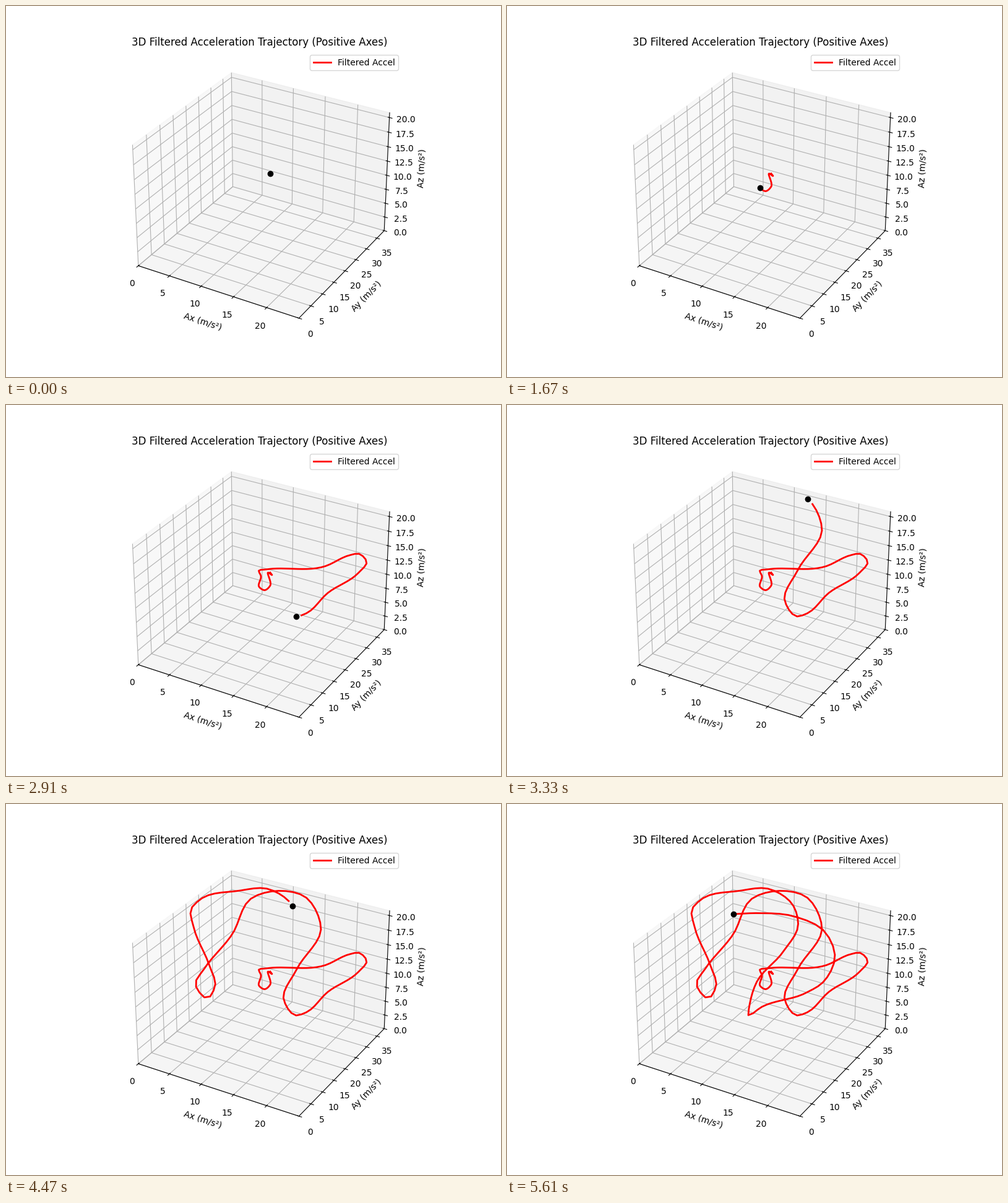
Animation of 800x600 px, one loop 5.63 s. Source, as a matplotlib script:

```python
import numpy as np
import matplotlib.pyplot as plt
from matplotlib.animation import FuncAnimation

LOOP_MS = 5630
FRAMES = 281
START = 8
W, H = 800, 600
LIMITS = (24.78, 38.6, 20.82)

# Legs of the trajectory: arrival frame and key points, in stage pixels
LEGS = [
    (52, [(427, 271), (430, 275), (424, 271)]),
    (83, [(427, 292), (418, 299.5), (409, 294)]),
    (98, [(412, 276.5), (408.5, 268)]),
    (121, [(420, 266), (515, 261), (557, 242.5)]),
    (145, [(570, 240.5), (583, 254), (570, 271), (520, 304), (484, 337.5),
           (469, 342)]),
    (186, [(449, 317), (470, 267), (509, 200), (484, 150.5), (438, 140.5),
           (396, 153), (366, 210), (320, 267)]),
    (223, [(306, 291), (326, 314.5), (338, 294), (329, 262), (303, 198),
           (299, 170), (313, 155), (375, 140.5), (424, 137.5), (463, 165)]),
    (244, [(470.5, 196), (447, 238), (403, 289), (391.5, 328), (390, 341.5)]),
    (259, [(411, 328.5), (483, 305.5), (510.5, 288.5)]),
    (280, [(530, 246), (514, 207), (465, 182), (405, 176.5), (366, 178)]),
]


def hermite(t, p, at, rest=False):
    """Smooth curve through (t, p); with rest it starts and ends at zero speed."""
    m = np.gradient(p, t, axis=0)
    if rest:
        m[0] = m[-1] = 0
    i = np.clip(np.searchsorted(t, at, side="right") - 1, 0, len(t) - 2)
    h = (t[i + 1] - t[i])[:, None]
    u = (at - t[i])[:, None] / h
    return ((1 + 2 * u) * (1 - u) ** 2 * p[i] + u * (1 - u) ** 2 * h * m[i]
            + u * u * (3 - 2 * u) * p[i + 1] + u * u * (u - 1) * h * m[i + 1])


def lengths(p):
    steps = np.hypot(*np.diff(p, axis=0).T)
    return np.append(0, np.cumsum(steps))


def travel(frames):
    """Position at each frame, moving smoothly by arc length from leg to leg."""
    keys = np.array([p for _, leg in LEGS for p in leg], float)
    chord = lengths(keys)
    fine = np.linspace(0, chord[-1], 8000)
    arc = lengths(hermite(chord, keys, fine))

    times = np.array([START] + [end for end, _ in LEGS], float)
    ends = np.cumsum([1] + [len(leg) for _, leg in LEGS]) - 1
    ends[1:] -= 1
    marks = np.interp(chord[ends], fine, arc)
    done = hermite(times, marks[:, None], frames, rest=True)[:, 0]
    return hermite(chord, keys, np.interp(done, arc, fine))


def lift(ax, pixels):
    """Place stage pixels on the plane facing the viewer at the box centre."""
    xy = ax.transData.inverted().transform(pixels * (1, -1) + (0, H))
    proj = ax.get_proj()
    centre = proj @ np.append(np.array(LIMITS) / 2, 1)
    z = np.full(len(xy), centre[2] / centre[3])
    v = np.linalg.inv(proj) @ np.vstack([xy.T, z, np.ones_like(z)])
    return v[:3] / v[3]


fig = plt.figure(figsize=(W / 100, H / 100), dpi=100)
ax = fig.add_subplot(projection="3d")
ax.set(xlim=(0, LIMITS[0]), ylim=(0, LIMITS[1]), zlim=(0, LIMITS[2]),
       xlabel="Ax (m/s²)", ylabel="Ay (m/s²)", zlabel="Az (m/s²)",
       title="3D Filtered Acceleration Trajectory (Positive Axes)")
trail, = ax.plot([], [], [], "r-", lw=2, label="Filtered Accel")
head, = ax.plot([], [], [], "ko", ms=6)
ax.legend(loc="upper right")

fig.draw_without_rendering()
path = lift(ax, travel(np.maximum(np.arange(FRAMES), START)))


def update(k):
    trail.set_data_3d(*path[:, :k])
    head.set_data_3d(*path[:, k:k + 1])
    return trail, head


anim = FuncAnimation(fig, update, frames=FRAMES, interval=LOOP_MS / FRAMES,
                     repeat=True, cache_frame_data=False)
plt.show()
```
